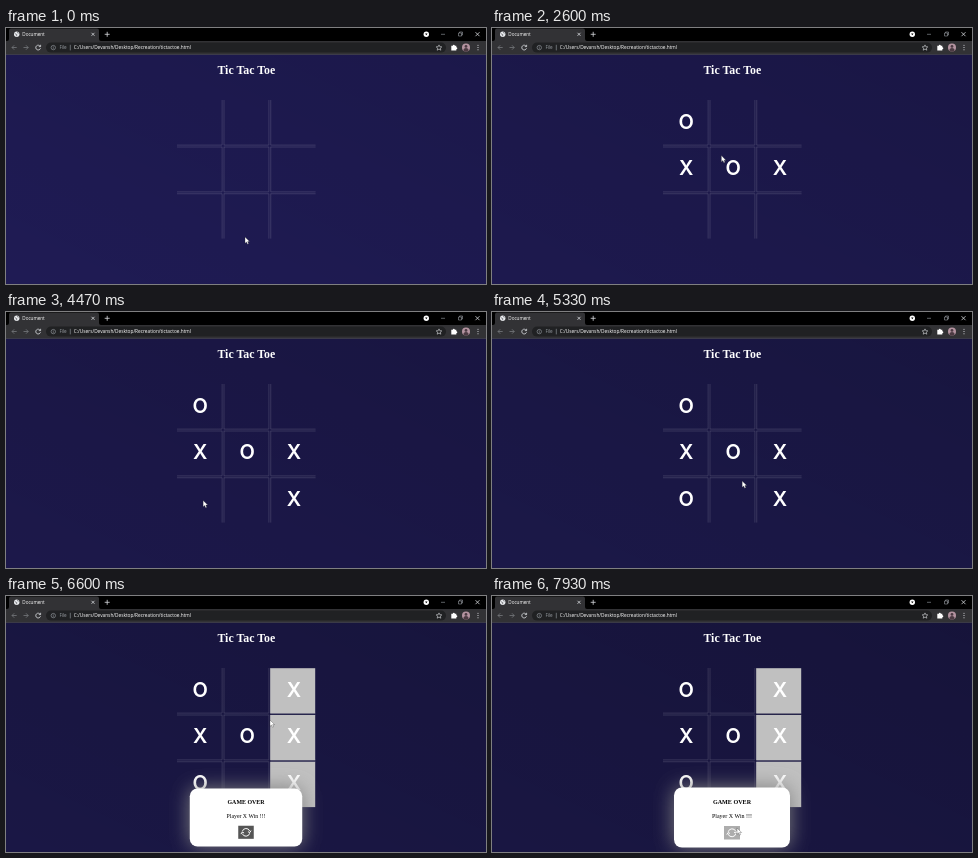
Write an HTML page that moves like this. It is 480x256 px and loops after 8000 ms.

```html
<!DOCTYPE html>
<html lang="en">
<head>
<meta charset="utf-8">
<title>Tic Tac Toe</title>
<style>
  html, body { margin: 0; width: 100%; height: 100%; overflow: hidden; background: #1c194e; }
  svg { display: block; width: 480px; height: 256px; }
  .ui { font: 500 4.6px "Open Sans", sans-serif; fill: #fff; }
  .serif { font-family: "Liberation Serif", serif; text-anchor: middle; }
  .mark { font: 600 20px Inter, sans-serif; fill: #fff; text-anchor: middle; }
  .icon { fill: none; stroke: #dadce0; stroke-width: .8; }
  .icon .dim { stroke: #9aa0a6; stroke-width: .6; }
</style>
</head>
<body>
<svg viewBox="0 0 480 256">
  <defs>
    <linearGradient id="shade" x1="0" y1="1" x2="1" y2="0">
      <stop stop-opacity="0"/>
      <stop offset="1" stop-opacity=".12"/>
    </linearGradient>
    <filter id="blur" x="-40%" y="-80%" width="180%" height="260%"><feGaussianBlur stdDeviation="10"/></filter>
  </defs>

  <rect id="page" y="26" width="480" height="230"/>
  <rect y="26" width="480" height="230" fill="url(#shade)"/>
  <text class="serif" x="240.3" y="46" font-size="11.85" font-weight="700" fill="#fff">Tic Tac Toe</text>

  <g id="board"></g>

  <g id="popup">
    <rect x="182" y="191.5" width="116" height="60" rx="8" fill="#808080" filter="url(#blur)"/>
    <rect x="182" y="191.5" width="116" height="60" rx="8" fill="#fff"/>
    <text class="serif" x="240" y="208" font-size="6.1" font-weight="700">GAME OVER</text>
    <text class="serif" x="240" y="221.8" font-size="6">Player X Win !!!</text>
    <rect id="again" x="232" y="230" width="16" height="13.5"/>
    <g fill="none" stroke="#fff">
      <path d="M236.2 235.8a4 4 0 0 1 7.6-.4M243.8 237.8a4 4 0 0 1-7.6.4"/>
      <path d="M242 236.2l2 .8 1.2-2M238 237.4l-2-.8-1.2 2"/>
    </g>
  </g>

  <g id="browser">
    <rect width="480" height="14" fill="#000"/>
    <path d="M1 13q2 0 2-2V2.5Q3 .5 5 .5H91q2 0 2 2V11q0 2 2 2z" fill="#323235"/>
    <rect y="13" width="480" height="13.5" fill="#323235"/>
    <rect x="40" y="14.6" width="400" height="10" rx="5" fill="#202123"/>
    <rect y="26" width="480" height=".6" fill="#4a4a50"/>
    <circle cx="10.7" cy="6.3" r="2.7" fill="#e8eaed"/>
    <path d="M8.8 5.6l2 1-.3 1.6M11 4.4l1.6.8" stroke="#55565c" stroke-width=".7" fill="none"/>
    <text class="ui" x="16.3" y="8">Document</text>
    <g class="icon">
      <path d="M85.5 4.8l3 3m0-3l-3 3M98.7 6.3h5m-2.5-2.5v5"/>
      <path class="dim" d="M435 6.3h4M452.5 5h3v3h-3zM453.5 5v-1h3v3h-1"/>
      <path d="M469.5 4.2l4 4m0-4l-4 4"/>
      <path d="M10.7 19.5H6m2.2-2.2L6 19.5l2.2 2.2M17.5 19.5h4.7M20 17.3l2.2 2.2-2.2 2.2" stroke="#77797d"/>
      <path d="M34.2 18.3a2.4 2.4 0 1 0 .3 1.9M34.6 16.8v1.8h-1.8"/>
      <circle class="dim" cx="47.3" cy="19.6" r="2.2"/>
      <path class="dim" d="M47.3 19.2v1.6m0-2.6v.5M64.3 16.8v5.6"/>
      <path d="M433 16.9l.8 1.8 2 .2-1.5 1.3.5 2-1.8-1.1-1.8 1.1.5-2-1.5-1.3 2-.2z" stroke-width=".6"/>
    </g>
    <circle cx="420.3" cy="6.3" r="2.7" fill="#fff"/>
    <path d="M419.1 5.6h2.4l-1.2 1.7z"/>
    <text class="ui" x="53.4" y="21.3" style="fill:#9aa0a6">File</text>
    <text class="ui" x="67.8" y="21.4" style="font-size:4.75px">C:/Users/Devansh/Desktop/Recreation/tictactoe.html</text>
    <path d="M445.3 17.8h1.5a1 1 0 0 1 2 0h1.5v1.4a1 1 0 0 1 0 2v1.3h-5z" fill="#fff"/>
    <circle cx="460" cy="19.6" r="4" fill="#b493a0"/>
    <path d="M457.4 22.6q0-2.6 2.6-2.6t2.6 2.6a4 4 0 0 1-5.2 0z" fill="#4b3a42"/>
    <circle cx="460" cy="18.4" r="1.4" fill="#4b3a42"/>
    <path d="M472 17.3h.01M472 19.5h.01M472 21.7h.01" stroke="#e8eaed" stroke-width="1.1" stroke-linecap="round"/>
  </g>

  <path id="cursor" d="M0 0V6.3L1.5 5 2.5 7.2 3.6 6.7 2.7 4.6H4.6Z" fill="#fff" stroke="#222" stroke-width=".3"/>
</svg>

<script>
const LOOP = 8000, STEP = 1000 / 15, WIN = 6380, HOVER = 7800;
const LEFT = 171, TOP = 72, PITCH = 46.8, SIZE = 45;
const $ = id => document.getElementById(id);

// The pointer's stops; one with a symbol is a click in the cell under it.
const stops = [
  { t: 70, x: 239, y: 209 },
  { t: 460, x: 200, y: 146, symbol: "X" },
  { t: 1000, x: 240, y: 146, symbol: "O" },
  { t: 1730, x: 278, y: 144, symbol: "X" },
  { t: 2330, x: 200, y: 100, symbol: "O" },
  { t: 3870, x: 282, y: 177, symbol: "X" },
  { t: 4680, x: 193, y: 189, symbol: "O" },
  { t: 5330, x: 250, y: 169.5 },
  { t: WIN, x: 275, y: 99, symbol: "X" },
  { t: 6600, x: 264, y: 124 },
  { t: LOOP, x: 245, y: 232 }
];

const at = (start, i) => start + i * PITCH;
const cell = (start, v) => Math.floor((v - start) / PITCH);
const mix = (a, b, p) => a + (b - a) * p;
const clamp = p => Math.min(1, Math.max(0, p));
const easeOut = (p, power) => 1 - (1 - clamp(p)) ** power;
const show = (el, on) => el.setAttribute("visibility", on ? "visible" : "hidden");

function add(tag, attrs, text = "") {
  const el = document.createElementNS("http://www.w3.org/2000/svg", tag);
  for (const key in attrs) el.setAttribute(key, attrs[key]);
  el.textContent = text;
  $("board").append(el);
  return el;
}

function gridLine(x, y, width, height) {
  add("rect", { x, y, width, height, fill: "#fff", opacity: .17 });
}

for (let i = 0; i < 2; i++) {
  for (let j = 0; j < 3; j++) {
    for (const gap of [-.3, 1.6]) {
      gridLine(at(LEFT, i) + SIZE + gap, at(TOP, j), .8, SIZE);
      gridLine(at(LEFT, j), at(TOP, i) + SIZE + gap, SIZE, .8);
    }
  }
}

const wins = [0, 1, 2].map(row =>
  add("rect", { x: at(LEFT, 2) - .4, y: at(TOP, row) + .2, width: SIZE, height: SIZE + .3, fill: "#c0c0c0" }));

const marks = stops.filter(s => s.symbol).map(({ t, x, y, symbol }) => ({
  t,
  el: add("text", {
    class: "mark",
    x: at(LEFT, cell(LEFT, x)) + 23.3,
    y: at(TOP, cell(TOP, y)) + 28.5
  }, symbol)
}));

function pointer(t) {
  const k = stops.findIndex(s => s.t > t);
  const a = stops[Math.max(0, k - 1)], b = stops[k];
  const p = easeOut((t - a.t) / (b.t - a.t), 2.3);
  return [mix(a.x, b.x, p), mix(a.y, b.y, p)];
}

function render(time) {
  const t = Math.floor((time % LOOP + 4) / STEP) * STEP % LOOP;
  const p = t / LOOP;
  $("page").setAttribute("fill", `rgb(${mix(31, 25, p)},${mix(27, 22, p)},${mix(84, 66, p)})`);
  marks.forEach(m => show(m.el, t >= m.t));
  wins.forEach(el => show(el, t >= WIN));

  const scale = easeOut((t - WIN) / 320, 3);
  show($("popup"), scale > 0);
  $("popup").setAttribute("transform", `translate(240 221.5) scale(${scale}) translate(-240 -221.5)`);
  $("again").setAttribute("fill", t > HOVER ? "#adadad" : "#555");
  $("cursor").setAttribute("transform", `translate(${pointer(t)})`);
}

const start = performance.now();
function tick() {
  render(performance.now() - start);
  requestAnimationFrame(tick);
}
tick();
</script>
</body>
</html>
```
